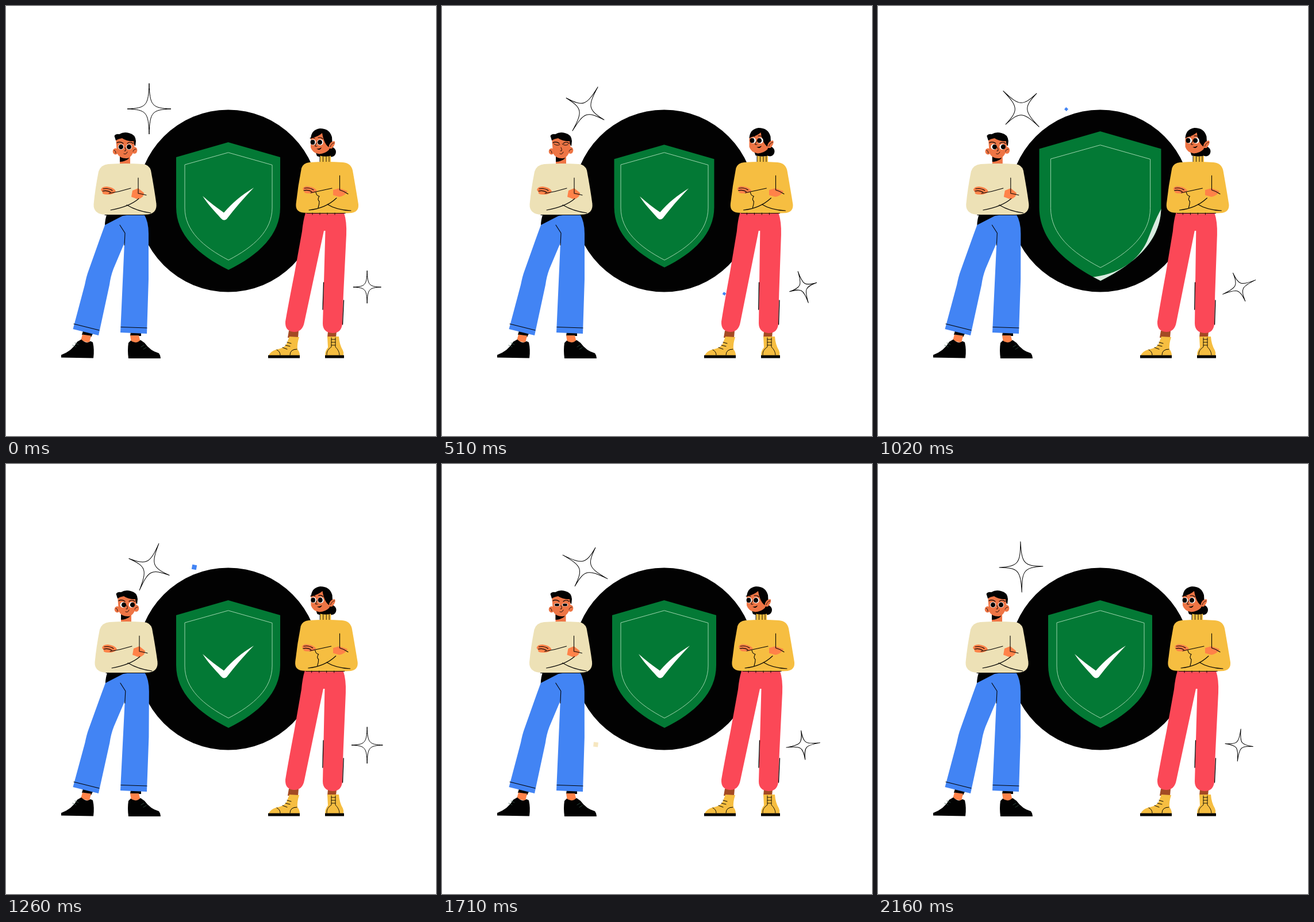
An HTML page with a canvas for the animation above (2.19 s loop, 748 by 748 pixels).

```html
<!DOCTYPE html>
<html lang="en">
<head>
<meta charset="utf-8">
<title>Shield</title>
<style>
html, body { margin: 0; width: 100%; height: 100%; overflow: hidden; background: #fff; }
canvas { display: block; width: 748px; height: 748px; }
</style>
</head>
<body>
<canvas id="stage"></canvas>
<script>
const SIZE = 748, LOOP = 2190, STEP = 30;
const canvas = document.getElementById('stage');
const ctx = canvas.getContext('2d');
const dpr = window.devicePixelRatio || 1;
canvas.width = canvas.height = SIZE * dpr;

const INK = '#020202', GREEN = '#037935', SKIN = '#ee7545', HAND = '#ff8249';
const CREAM = '#ede1b6', BLUE = '#4284f4', YELLOW = '#f6be41', RED = '#fb4857', BROWN = '#a34a24';

// Smooth monotone curve through [time, value] pairs, flat at both ends.
function track(...keys) {
  const n = keys.length;
  const rate = i => (keys[i + 1][1] - keys[i][1]) / (keys[i + 1][0] - keys[i][0]);
  const slope = keys.map((k, i) => {
    if (i === 0 || i === n - 1) return 0;
    const a = rate(i - 1), b = rate(i);
    return a * b <= 0 ? 0 : 2 * a * b / (a + b);
  });
  return t => {
    if (t <= keys[0][0]) return keys[0][1];
    if (t >= keys[n - 1][0]) return keys[n - 1][1];
    let i = 0;
    while (t > keys[i + 1][0]) i++;
    const [t0, a] = keys[i], [t1, b] = keys[i + 1];
    const h = t1 - t0, u = (t - t0) / h, v = 1 - u;
    return a * v * v * (1 + 2 * u) + b * u * u * (3 - 2 * u) +
      h * u * v * (slope[i] * v - slope[i + 1] * u);
  };
}

const spinBig = track([0, 0], [510, 30], [780, 87], [1020, 135], [1260, 202.5], [1710, 298], [2160, 358.5], [2190, 360]);
const spinSmall = track([0, 0], [510, 18.4], [780, 68.6], [1020, 113.5], [1260, 180], [1710, 278], [2160, 354], [2190, 360]);
const sizeSmall = track([0, 1], [510, 1.02], [780, 1.07], [1260, 1.12], [1710, 1.05], [2190, 1]);
const outerSize = track([330, 1], [510, 0.961], [690, 1.171], [1080, 1.171], [1230, 1]);
const innerSize = track([510, 1], [690, 1.13], [1080, 1.14], [1240, 1]);
const tickSize = track([330, 1], [510, 0.955], [600, 0], [1100, 0], [1230, 1]);
const manLean = track([0, 0], [510, 0], [780, 2], [1020, 0.8], [1260, 2], [1710, -0.5], [2190, 0]);
const manHead = track([0, 0], [510, 0], [780, 3.3], [1020, 0.8], [1260, 3], [1710, 0], [2190, 0]);
const manGaze = track([500, 0], [620, 1], [1590, 1], [1690, 0]);
const manLids = track([400, 1], [480, 0], [540, 0], [620, 1], [1600, 1], [1670, 0], [1710, 0.55], [1770, 1]);
const womanLean = track([0, 0], [510, -2.6], [1020, -2.6], [1260, -1.3], [1710, 0]);
const womanTurn = track([150, 0], [480, 1], [1050, 1], [1270, 0.1], [1500, 0]);

function fill(color, d) {
  ctx.fillStyle = color;
  ctx.fill(new Path2D(d));
}

function line(d, width = 1.1, color = INK) {
  ctx.strokeStyle = color;
  ctx.lineWidth = width;
  ctx.stroke(new Path2D(d));
}

function oval(color, x, y, rx, ry = rx) {
  ctx.fillStyle = color;
  ctx.beginPath();
  ctx.ellipse(x, y, rx, ry, 0, 0, 2 * Math.PI);
  ctx.fill();
}

function group(draw, x = 0, y = 0) {
  ctx.save();
  ctx.translate(x, y);
  draw();
  ctx.restore();
}

function scaled(cx, cy, s, draw) {
  group(() => {
    ctx.scale(s, s);
    ctx.translate(-cx, -cy);
    draw();
  }, cx, cy);
}

function star(x, y, a, b, degrees) {
  group(() => {
    ctx.rotate(degrees * Math.PI / 180);
    ctx.beginPath();
    ctx.moveTo(0, -b);
    for (const [sx, sy, down] of [[1, -1, true], [1, 1, false], [-1, 1, true], [-1, -1, false]]) {
      const near = [sx * a * 0.03, sy * b * 0.13], far = [sx * a * 0.13, sy * b * 0.03];
      if (down) ctx.bezierCurveTo(...near, ...far, sx * a, 0);
      else ctx.bezierCurveTo(...far, ...near, 0, sy * b);
    }
    ctx.closePath();
    ctx.strokeStyle = INK;
    ctx.lineWidth = 1;
    ctx.stroke();
  }, x, y);
}

const confetti = [
  { x: 491, y: 500.5, color: BLUE, from: 470, to: 820, fade: 0.7, turn: 90 },
  { x: 619.5, y: 258, color: RED, from: 680, to: 1020, fade: 0.75, turn: 45 },
  { x: 327.5, y: 179.5, color: BLUE, from: 970, to: 1350, fade: 0.85, turn: 45 },
  { x: 267.5, y: 488, color: '#efd28b', from: 1390, to: 1760, fade: 0.75, turn: 45 }
];

function drawConfetti(t) {
  for (const c of confetti) {
    const p = (t - c.from) / (c.to - c.from);
    if (p <= 0 || p >= 1) continue;
    const side = 8 * Math.min(1, 0.45 + p * 1.3);
    group(() => {
      ctx.globalAlpha = Math.min(1, (1 - p) / (1 - c.fade));
      ctx.rotate((45 - p * c.turn) * Math.PI / 180);
      ctx.fillStyle = c.color;
      ctx.fillRect(-side / 2, -side / 2, side, side);
    }, c.x, c.y);
  }
}

const SHIELD = 'M386.5 237L477 263V350C477 398 440 433 387 459C334 433 296 398 296 350V263Z';
const RIM = 'M387 255L463 276.5V351C463 391 431 419 387 442C343 419 311 391 311 351V276.5Z';
const BAND = 'M270 419L303 415C350 408 378 385 393 354C408 318 420 275 468 240L520 210L532 221L487 246C455 272 436 300 425 330C410 376 385 425 316 431L270 437Z';
const TICK = 'M342 330.5C355 342 367 351 379 359.5C394 342 410 329 431 316C414 334 398 352 384 370.5Q379 375 374 369.5C363 357 351 345 342 330.5Z';

function drawShield(t) {
  scaled(386.5, 348, outerSize(t), () => fill(GREEN, SHIELD));
  const inner = innerSize(t);
  scaled(387, 348.5, inner, () => line(RIM, 1 / inner, '#9fd5ae'));

  const tick = tickSize(t);
  if (tick > 0.01) scaled(386.5, 345, tick, () => fill('#fff', TICK));

  if (t > 570 && t < 1110) {
    const p = Math.min(1, (t - 570) / 510);
    const d = -344 + 438 * (1 - (1 - p) ** 3);
    const s = outerSize(t);
    const clip = new Path2D();
    clip.addPath(new Path2D(SHIELD), new DOMMatrix([s, 0, 0, s, 386.5 * (1 - s), 348 * (1 - s)]));
    group(() => {
      ctx.clip(clip);
      ctx.globalAlpha = Math.min(1, (1110 - t) / 60);
      ctx.translate(d * 0.8, d * 0.6);
      fill('#d9eadf', BAND);
      ctx.translate(70, 68);
      fill('#d9eadf', BAND);
    });
  }
}

// Keeps y = base in place while y = top moves sideways by dx.
function lean(dx, base, top, draw) {
  group(() => {
    const k = dx / (base - top);
    ctx.transform(1, 0, -k, 1, k * base, 0);
    draw();
  });
}

function manFace(t) {
  const gaze = manGaze(t), open = manLids(t);
  fill(SKIN, 'M191 229L224 231L223 247Q221 262 211 265Q198 266 193 256Z');
  oval(SKIN, 190.5, 253, 4.8, 5.4);
  oval(SKIN, 223.5, 251, 4.8, 6);
  line('M188 251Q191 251 191 256M221 253Q222 249 226 249', 0.8);
  fill(INK, 'M188.5 226Q191 222 197 223Q205 218 214 221Q225 223 226 235L225 244Q222 241 222 235Q211 236 202 230Q195 231 191 234Z');
  for (const x of [200, 214 + gaze]) {
    const ex = x + gaze * 0.6;
    if (open < 0.15) {
      line(`M${ex - 5} 240Q${ex} 244 ${ex + 5} 241`, 0.9);
    } else {
      oval('#fff', ex, 245, 5, 5 * open);
      oval(INK, ex + gaze * 1.4, 245, 4.1, 4.3 * open);
    }
  }
  line('M193 238Q198 235 204 239M211 239Q216 235 221 239', 1.2);
  line('M207 246Q209 249 208 252L206 252M205 257Q209 259 211 254', 0.9);
}

function drawMan(t) {
  const dx = manLean(t);

  fill(INK, 'M134 565L151 570L148 576L132 572ZM217 567H235V574H216Z');
  fill(HAND, 'M133 571.5L148 573.5L145 586L130 582ZM216 573H231L234 585L218 586Z');
  fill(INK, 'M96 611.5V607Q115 600 124 584L131 580Q140 589 147 583L151 585Q154 598 152 612.5Z');
  fill(INK, 'M213 613Q211 598 213 586L217 582Q226 589 234 581L241 586Q251 600 266 604Q269 608 269 613Z');
  line('M116 590L122 593M120 586L126 589M240 590L235 593M244 594L239 597', 0.8, '#35574a');

  lean(dx * 0.5, 560, 365, () => {
    fill(INK, 'M176 361H222L202 368L172 382Q172 371 176 361Z');
    fill(BLUE, 'M172 381L203 365L224 362H240Q248 375 248 396L248 475L245 570L199 568L206 412L187 457Q182 470 180 485L161 573L116.5 562L137 485Q140 470 143 462L159 417Q165 400 172 381Z');
    line('M198 381L207 395L206 416M118 553L162 564M200 558.5L245 560');
  });

  group(() => {
    fill(SKIN, 'M198 258H216V278H198Z');
    fill(INK, 'M198 261.5Q207 266 215 261L213 266Q206 271 198 271Z');
  }, dx);
  group(() => manFace(t), manHead(t));

  group(() => {
    fill(CREAM, 'M178 275Q208 273 238 275Q249 276 252 286Q258 318 261.5 344Q263 360 247 362.5Q209 365 168 362.5Q152 360 152.5 345Q155 318 161 288Q165 276 178 275Z');
    fill(HAND, 'M165 320Q166 314 175 314Q187 315 191 322Q188 328 177 328Q166 328 168 324Z');
    fill(HAND, 'M220 321L230 317L240 325Q240 334 229 336L218 332Z');
    line('M169 318Q178 316 185 321M168 322Q176 320 182 324M179 326Q198 323 217 317');
    line('M230 299V326M230 326Q237 327 244 329M182 355Q215 349 231 335M210 346Q228 357 252 360');
    line('M172 363.5H248', 1);
  }, dx);
}

function womanFace(turn) {
  const ey = 237 - turn * 2, ex = turn * 2.5;
  oval(INK, 566, 254, 8, 8.5);
  fill(INK, 'M537 250L563 246L565 261Q550 265 541 261Z');
  fill(SKIN, 'M530 230L549 217L565 232L562 250Q555 257 545 257.5Q533 256 530 246Z');
  fill(INK, 'M530 231Q531 215 546 213Q563 213 567 228L568 246L562 246Q553 240 550 221Q543 227 534 229Z');
  fill(SKIN, 'M562 242Q565 235 571.5 235Q574 240 567 248L561 248Z');
  line('M564 245Q566 239 571 238', 0.8);
  oval('#fff', 534 + ex, ey, 5.1);
  oval('#fff', 546.5 + ex, ey, 5.3);
  oval(INK, 533.5 + ex - turn, ey, 3.9, 4.2);
  oval(INK, 546 + ex - turn, ey, 4.1, 4.3);
  line(`M${529 + ex} ${ey - 7}Q${533 + ex} ${ey - 9} ${537 + ex} ${ey - 7}M${543 + ex} ${ey - 8}Q${548 + ex} ${ey - 9} ${551 + ex} ${ey - 6}`, 1.1);
  line(`M${540 + ex} ${ey + 1}L${537.5 + ex} ${ey + 7}H${541 + ex}`, 0.9);
  fill(INK, `M${540 + ex} ${ey + 11}Q${544 + ex} ${ey + 12} ${549 + ex} ${ey + 9}Q${546 + ex} ${ey + 16} ${540 + ex} ${ey + 11}Z`);
}

function drawWoman(t) {
  const dx = womanLean(t), turn = womanTurn(t);

  fill(BROWN, 'M492 565H509L508 577H490ZM560 566H575L574 577H559Z');
  fill(YELLOW, 'M493 575L510 576Q506 588 507 597Q511 602 511 608H457Q460 601 469 598Q485 595 488 588Z');
  fill(YELLOW, 'M559 575H579Q580 589 586 599Q588 603 587 608H555Q555 600 560 594Z');
  fill(INK, 'M456 607.5H511V612.5H456ZM555 607.5H588V612.5H555Z');
  line('M489 585L496 587M486 590L494 592M481 594L489 597M494 607Q494 597 506 597M471 598Q477 601 477 607', 1);
  line('M566 577V593Q557 599 558 607M573 577V593Q580 600 580 607M566 580H573M566 585H573M566 590H573', 0.9);

  lean(dx, 550, 361, () => {
    fill(RED, 'M521 360H588Q593 375 592 398L587 500L585 552Q584 569 568 569Q551 568 551 552L555.5 391H553L519 550Q516 567 501 567Q485 566 486 549Q490 525 502 464L515 392Q517 372 521 360Z');
    line('M552.5 481L551 528M587.5 512L585.5 554', 1.3);
  });

  group(() => womanFace(turn), turn * 4.5, -turn);
  group(() => {
    fill(YELLOW, 'M546 260.5Q556 263 565 260.5V276H546Z');
    line('M546 261V271M551.5 262V271M557 262V271M562 261V271', 0.9);
  }, turn * 2);

  group(() => {
    fill(YELLOW, 'M528 272Q557 270 586 272Q600 273 603 286Q609 320 613 345Q614 358 601 360Q558 363 517 359.5Q503 358 504.5 344Q508 312 514 282Q517 273 528 272Z');
    fill(HAND, 'M516 318Q519 312 527 314Q536 315 541 321Q538 326 528 326Q517 326 519 322Z');
    line('M519 317Q528 315 535 320M518 321Q526 319 532 323M530 325Q549 321 567 317');
    line('M539 324Q540 330 545 331Q541 336 545 340Q545 345 543 351');
    line('M527 355Q556 352 575 334M559 345Q575 355 600 356');
    line('M523 360.5H590', 1.1);
    line('M533 360V363M546 360V363M559 360V363M572 360V363', 1);
  }, dx);

  // The right forearm stays put while the body sways.
  fill(HAND, 'M569 320L580 317L594 322Q590 330 580 332L569 329Z');
  line('M580.5 295V320M580.5 320Q588 322 595 327');
}

function render(t) {
  ctx.setTransform(dpr, 0, 0, dpr, 0, 0);
  ctx.lineCap = ctx.lineJoin = 'round';
  ctx.fillStyle = '#fff';
  ctx.fillRect(0, 0, SIZE, SIZE);
  oval(INK, 386.5, 339, 158.5);
  drawShield(t);
  drawConfetti(t);
  star(249, 179, 38, 44, spinBig(t));
  const s = sizeSmall(t);
  star(628.2, 489, 24.3 * s, 28.2 * s, -spinSmall(t));
  drawMan(t);
  drawWoman(t);
}

const start = performance.now();
function tick() {
  const t = (performance.now() - start) % LOOP;
  render(Math.floor(t / STEP) * STEP);
  requestAnimationFrame(tick);
}
tick();
</script>
</body>
</html>
```
